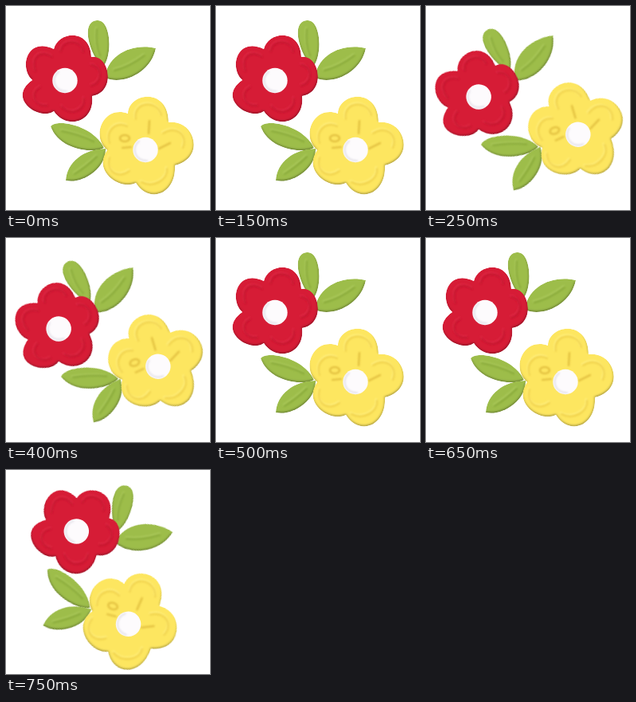
Write an HTML page that moves like this. It is 256 by 256 pixels and loops after 1 s.

```html
<!DOCTYPE html>
<html lang="en">
<head>
<meta charset="utf-8">
<title>Swaying flowers</title>
<style>
  html, body { margin: 0; width: 100%; height: 100%; overflow: hidden; background: #fff; }
  svg { display: block; width: 100vw; height: 100vh; }
</style>
</head>
<body>
<svg viewBox="0 0 256 256">
  <defs>
    <!-- soft clay relief, lit from above -->
    <filter id="puff" color-interpolation-filters="sRGB">
      <feGaussianBlur in="SourceAlpha" stdDeviation="1.6"/>
      <feDiffuseLighting surfaceScale="1.5" diffuseConstant="1.12" lighting-color="#fff" result="light">
        <feDistantLight azimuth="255" elevation="63"/>
      </feDiffuseLighting>
      <feComposite in="SourceGraphic" in2="light" operator="arithmetic" k1=".5" k2=".5" result="lit"/>
      <feComposite in="lit" in2="SourceAlpha" operator="in"/>
    </filter>
    <filter id="soft" x="-50%" y="-50%" width="200%" height="200%"><feGaussianBlur stdDeviation="1"/></filter>
  </defs>
  <g id="bouquet"></g>
</svg>
<script>
const bouquet = document.getElementById('bouquet');

const groove = (d, color, width, shift = 0) =>
  `<path d="${d}" transform="translate(${shift * .6} ${shift})" fill="none" stroke="${color}"
    stroke-width="${width}" stroke-linecap="round" filter="url(#soft)"/>`;

// A raised shape with pressed-in lines: a dark groove beside a light ridge
const clay = (outline, lines, [fill, dark, light]) =>
  `<path d="${outline}" fill="${fill}" filter="url(#puff)"/>` +
  groove(lines, light, 2.4, -1.8) + groove(lines, dark, 2);

const button = (x, y) =>
  `<circle cx="${x}" cy="${y}" r="15.7" fill="#fdfbfd"/>` +
  groove(`M${x - 8} ${y - 11}A13.6 13.6 0 0 0 ${x + 2} ${y + 13.4}`, '#e2e0e8', 2);

const green = ['#9dbd4a', '#87a838', '#abc95c'];
const red = ['#d61c36', '#c4142d', '#de2c45'];
const yellow = ['#fde660', '#efd04a', '#ffee7c'];

bouquet.innerHTML = [
  clay('M122 76C108 68 91 20 114 18C132 16 134 62 122 76Z', 'M114 29Q112 48 118 62', green),
  clay('M124 92C126 60 160 46 188 53C182 84 146 100 124 90Z', 'M136 81Q154 77 174 62', green),
  clay('M56 151C64 141 110 150 123 178C108 186 66 180 56 151Z', 'M70 157Q92 161 110 170', green),
  clay('M75 219C76 196 98 179 125 179C126 205 94 224 75 219Z', 'M86 211Q102 201 114 189', green),
  clay('M60 54C66 31 106 28 107 64C130 60 139 108 108 113C112 146 76 156 60 132C42 145 0 116 33 93C16 78 26 38 60 54Z',
    'M37 82C31 62 46 55 58 64M69 57C70 42 95 41 97 58M107 74C122 76 121 98 107 100' +
    'M98 116C100 134 78 138 70 126M52 125C36 127 29 110 43 102', red),
  clay('M153 135C154 108 204 102 204 146C236 141 252 190 212 200C214 236 180 249 163 222C142 232 108 206 127 181C106 164 122 124 153 135Z',
    'M163 142C159 120 190 117 195 137M197 160C213 149 229 162 222 178M130 172C125 155 139 145 152 151' +
    'M170 221C185 229 204 218 202 204M130 190C125 208 141 218 155 207', yellow),
  // short deep dents on the yellow petals
  groove('M180 144L179 160M192 179L206 172M146 178L157 177M143 166a6 4 0 1 1 12 0a6 4 0 1 1 -12 0', '#e0bd3c', 2.2),
  button(74, 93.5),
  button(175, 180.5)
].join('');

// The whole drawing tips in hard steps about one pivot
const tilts = [0, -20, 0, 20];
function draw() {
  const tilt = tilts[Math.floor(performance.now() % 1000 / 250)];
  bouquet.setAttribute('transform', `rotate(${tilt} 128 126)`);
  requestAnimationFrame(draw);
}
draw();
</script>
</body>
</html>
```
